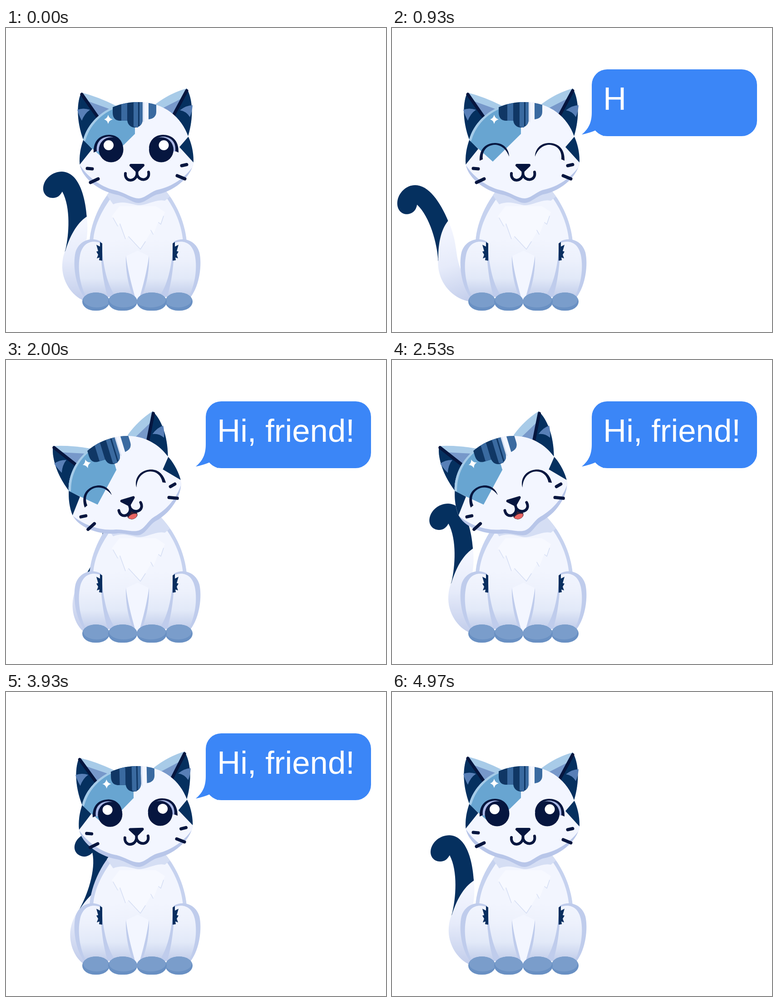
These frames come from a looping animation (837x669 px, 5010 ms). An HTML page with a canvas:

```html
<!DOCTYPE html>
<html lang="en">
<head>
<meta charset="utf-8">
<title>Friendly cat</title>
<style>
html, body { margin: 0; width: 100%; height: 100%; overflow: hidden; background: #fff; }
canvas { display: block; width: 837px; height: 669px; }
</style>
</head>
<body>
<canvas id="stage" width="837" height="669"></canvas>
<script>
const ctx = document.getElementById('stage').getContext('2d');
const LOOP = 5010;
const NAVY = '#05305f', INK = '#06163f', LAV = '#bfccec', BLUE = '#3a6aa0';
const TEXT = 'Hi, friend!';

// [time, degrees] pairs, joined by straight segments
const TAIL = [[0, 0], [970, -18.8], [2010, 22], [2980, -18.8], [4010, 19], [LOOP, 0]];
const TILT = [[0, 0], [1000, 0], [2000, -17], [3000, -17], [4000, 0], [LOOP, 0]];

function track(keys, t) {
  for (let i = 1; i < keys.length; i++) {
    const [t0, a] = keys[i - 1], [t1, b] = keys[i];
    if (t <= t1) return a + (b - a) * (t - t0) / (t1 - t0);
  }
  return keys[keys.length - 1][1];
}

const within = (t, a, b) => t >= a && t < b;

function fill(d, color) {
  ctx.fillStyle = color;
  ctx.fill(new Path2D(d));
}

function line(d, width, color = INK) {
  ctx.strokeStyle = color;
  ctx.lineWidth = width;
  ctx.lineCap = ctx.lineJoin = 'round';
  ctx.stroke(new Path2D(d));
}

function oval(x, y, rx, ry, color) {
  ctx.fillStyle = color;
  ctx.beginPath();
  ctx.ellipse(x, y, rx, ry, 0, 0, Math.PI * 2);
  ctx.fill();
}

function shade(y0, y1, ...colors) {
  const g = ctx.createLinearGradient(0, y0, 0, y1);
  colors.forEach((c, i) => g.addColorStop(i / (colors.length - 1), c));
  return g;
}

function group(draw) {
  ctx.save();
  draw();
  ctx.restore();
}

function turn(x, y, deg, draw) {
  group(() => {
    ctx.translate(x, y);
    ctx.rotate(deg * Math.PI / 180);
    ctx.translate(-x, -y);
    draw();
  });
}

// Draws once as is and once flipped about the line x = axis
function both(axis, draw) {
  draw();
  group(() => {
    ctx.translate(axis * 2, 0);
    ctx.scale(-1, 1);
    draw();
  });
}

function drawTail(t) {
  turn(180, 591, track(TAIL, t), () => {
    ctx.clip(new Path2D('M103 374 C89 374 81 363 82 351 C84 331 103 316 123 316 ' +
      'C158 317 174 364 178 415 C182 448 177 470 172 500 C170 525 170 550 186 590 ' +
      'L172 600 C145 590 122 556 124 520 C125 504 128 496 131 488 ' +
      'C139 455 143 395 124 360 C119 369 113 374 103 374Z'));
    fill('M60 300 H240 V620 H60Z', shade(420, 600, '#f5f7ff', '#e6ebfa', '#c2cdeb'));
    fill('M60 300 H178 V415 C155 430 140 460 131 490 L120 505 L60 480Z', NAVY);
  });
}

function drawBody() {
  const coat = shade(465, 594, '#f2f5fe', '#edf1fc', '#e2e9f8', '#bfcbe9');
  fill('M250 340 C215 365 186 425 184 470 V590 H395 L398 470 C394 425 372 375 335 340Z', '#c6d2ef');
  fill('M240 362 C213 398 194 432 192 470 V590 H389 L390 470 C386 425 367 390 345 362Z', coat);
  fill('M250 340 C240 347 230 356 222 368 L236 388 C260 378 280 390 293 390 C312 390 330 376 350 380 L361 371 Q348 352 335 340Z', '#d5def4');

  fill('M233 414 L246 436 L252 430 L263 466 L270 458 L296 488 L321 446 L325 454 L335 428 L341 432 L350 405 L330 392 H250Z', '#f7f9ff');
  line('M236 418 L246 436 M251 431 L263 464 M270 459 L296 487 L307 470 M319 445 L324 454 M336 428 L341 432 L347 414', 1.5, '#d5def4');

  both(289.5, () => {
    fill('M209 470 C188 458 160 468 153 494 C147 520 152 565 172 592 H242 C224 568 213 525 211 474Z', LAV);
    fill('M208 473 C186 465 168 475 163 500 C157 530 163 565 176 591 H224 C214 560 209 520 208 473Z', coat);
    fill('M211 470 C213 520 227 570 243 592 H289 C276 570 265 540 264 502Z', coat);
  });
  fill('M264 502 C266 550 278 585 289.5 608 C301 585 313 550 315 502 L290 490Z', '#f3f6ff');
  both(289.5, () => {
    fill('M264 501 C263 545 274 585 288 606 C280 575 270 545 264 501Z', LAV);
    fill('M207 471 L212 474 V512 L205 511 L206 505 L200 507 L203 499 L199 492 L203 491 L199 477 L207 481Z', '#082e5f');
  });

  for (const [x, rx] of [[198, 30], [381, 30], [257, 32], [321, 33]]) {
    group(() => {
      ctx.beginPath();
      ctx.roundRect(x - rx, 582, rx * 2, 40, [rx, rx, 28, 28].map(r => ({ x: r, y: 20 })));
      ctx.clip();
      fill('M150 575 H440 V630 H150Z', '#6990c3');
      oval(x + (x < 289 ? 2 : -2), 598, rx, 17, '#7a9dcb');
    });
  }
}

function drawEars() {
  fill('M166 142 Q202 151 242 171 L245 200 L171 248 C153 200 157 160 166 142Z', '#a8cbe8');
  fill('M172 158 L230 179 L205 204Z', '#7798ca');
  fill('M166 142 C157 160 153 200 171 248 L205 201Z', NAVY);
  fill('M157 180 Q170 175 185 180 Q173 188 167 204 Q160 191 157 180Z', '#587fb7');
  line('M167 146 L202 196', 7);

  fill('M398 133 C411 155 414 195 401 238 L330 200 V167 Q362 143 398 133Z', '#a8cbe8');
  fill('M393 152 L338 180 L364 202Z', '#7798ca');
  fill('M398 133 C411 155 414 195 401 238 L364 200Z', NAVY);
  fill('M383 181 Q397 170 411 170 Q410 184 405 196 Q397 183 383 181Z', '#587fb7');
  line('M398 138 L369 192', 7);
}

function drawEyes(closed) {
  const axis = 286.5;
  const lid = 'M193 292 C192 264 209 253 227 253 C247 253 258 268 258 283 C251 264 238 257 226 257 C209 258 198 270 200 289Z';
  if (!closed) {
    both(axis, () => fill('M199 272 C199 248 212 239 228 239 C244 239 255 250 257 264Z', '#abb8e6'));
    for (const [x, shineX] of [[231.5, 226], [342, 347.5]]) {
      oval(x, 268, 27, 27.5, INK);
      oval(shineX, 258, 11, 11, '#fff');
    }
  }
  group(() => {
    if (!closed) ctx.translate(0, -18);
    both(axis, () => fill(lid, INK));
  });
}

function drawHead(t) {
  const laugh = within(t, 2000, 3500);
  const closed = laugh || within(t, 650, 1150);
  turn(293, 374, track(TILT, t), () => {
    drawEars();
    group(() => {
      ctx.clip(new Path2D('M170 247 C180 205 225 163 291 163 C350 163 387 198 401 238 ' +
        'C408 252 413 272 413 292 C413 322 375 358 334 366 C318 370 306 385 292 385 ' +
        'C278 385 264 371 244 367 C200 358 162 325 162 294 C162 275 165 262 170 247Z'));
      fill('M150 150 H430 V400 H150Z', '#b8c6e9');
      fill('M150 150 H425 V280 C410 318 375 347 334 356 C318 360 306 375 292 375 C278 375 262 363 244 358 C205 350 170 322 150 280Z', '#f3f6ff');
      fill('M150 150 H284 V233 L222 294 L165 243Z', '#68a5d1');
      line('M171 245 C182 208 215 172 270 164', 9, '#a5cbe8');
      fill('M150 227 L190 266 L150 316Z M425 212 L382 262 L425 309Z', NAVY);

      fill('M235 150 H268 V204 H249 Q235 202 235 186Z', '#103765');
      fill('M254 150 H267 V204 H254Z', BLUE);
      fill('M267 150 H301 V201 C301 225 267 225 267 201Z', '#103765');
      fill('M281 150 H291 V219 Q281 218 281 216Z M294 150 H301 V201 Q301 211 294 216Z', BLUE);
      fill('M314 150 H331 V184 Q331 199 314 201Z', BLUE);
      line('M303 164 V206', 1.5, '#c9d6ee');
    });
    fill('M225 191 Q227 199 235 201 Q227 203 225 211 Q223 203 216 201 Q223 199 225 191Z', '#fff');
    drawEyes(closed);

    if (laugh) {
      oval(288.5, 338.5, 11.5, 9, '#352033');
      fill('M278 341 Q288 333 299 339 C298 344 294 347 288.5 347 C283 347 279 344 278 341Z', '#ea6562');
    }
    const nose = 'M275 302 H302 L288.5 315Z';
    fill(nose, INK);
    line(nose, 6);
    line('M288.5 315 V323 M263 320 C261 339 285 340 288.5 322 C293 339 318 337 314 317', 6);
    line('M179 309 L190 310 M186 340 L203 332 M387 303 L398 300.5 M377 325 L394 332', 7);
  });
}

function bubbleScale(t) {
  if (t < 500) return Math.sin(Math.max(0, (t - 200) / 300) * Math.PI / 2);
  return 1 - Math.pow(Math.min(1, Math.max(0, (t - 4500) / 330)), 1.4);
}

function drawBubble(t) {
  const s = bubbleScale(t);
  if (s <= 0) return;
  group(() => {
    ctx.translate(418, 235);
    ctx.scale(s, s);
    ctx.translate(-418, -235);
    ctx.fillStyle = '#3b86f7';
    ctx.beginPath();
    ctx.roundRect(440, 91, 364, 147, 34);
    ctx.fill();
    fill('M440 185 C440 207 434 221 418 234.5 Q435 231 449 225 L466 238 L480 200Z', '#3b86f7');
    const count = Math.max(0, Math.min(TEXT.length, Math.floor((t - 800) / 100)));
    ctx.fillStyle = '#fff';
    ctx.font = '70.8px "Liberation Sans", Arial, sans-serif';
    ctx.fillText(TEXT.slice(0, count), 465, 180);
  });
}

function draw(t) {
  ctx.fillStyle = '#fff';
  ctx.fillRect(0, 0, 837, 669);
  drawTail(t);
  drawBody();
  drawHead(t);
  drawBubble(t);
}

const start = performance.now();
function frame(now) {
  draw(Math.max(0, now - start) % LOOP);
  requestAnimationFrame(frame);
}
draw(0);
requestAnimationFrame(frame);
</script>
</body>
</html>
```
